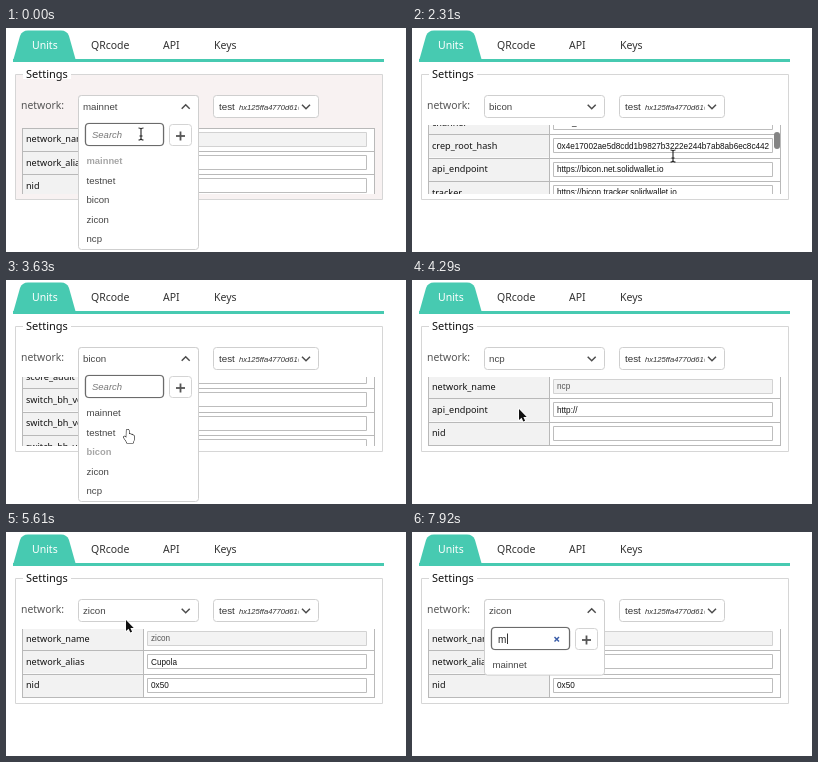
An HTML page with a canvas that plays this animation: 400 px wide and 224 px high, repeating every 8 s.

```html
<!DOCTYPE html>
<html lang="en">
<head>
<meta charset="utf-8">
<title>Network settings</title>
<style>
  html, body { margin: 0; width: 100%; height: 100%; overflow: hidden; background: #fff; }
  canvas { display: block; width: 400px; height: 224px; }
</style>
</head>
<body>
<canvas id="stage"></canvas>
<script>
const W = 400, H = 224, LOOP = 8000, STEP = 330;
const canvas = document.getElementById('stage');
const ctx = canvas.getContext('2d');
const dpr = window.devicePixelRatio || 1;
canvas.width = W * dpr;
canvas.height = H * dpr;

const SANS = '"Liberation Sans", Arial, sans-serif';
const NOTO = '"Noto Sans", "Open Sans", sans-serif';
const GREEN = '#47cab1';
const ROW = 23.4;
const VIEW = { x: 16, y: 97, w: 353, h: 69 };
const NETWORKS = ['mainnet', 'testnet', 'bicon', 'zicon', 'ncp'];

const basic = (name, alias, nid) => [
  ['network_name', name], ['network_alias', alias], ['nid', nid]
];
const ROWS = {
  mainnet: basic('mainnet', 'Mainnet', '0x1'),
  testnet: basic('testnet', 'Arcade', '0x2'),
  zicon: basic('zicon', 'Cupola', '0x50'),
  ncp: [['network_name', 'ncp'], ['api_endpoint', 'http://'], ['nid', '']],
  bicon: [
    ...basic('bicon', 'Orchard', '0x3'),
    ['channel', 'icon_dex'],
    ['crep_root_hash', '0x4e17002ae5d8cdd1b9827b3222e244b7ab8ab6ec8c442'],
    ['api_endpoint', 'https://bicon.net.solidwallet.io'],
    ['tracker', 'https://bicon.tracker.solidwallet.io'],
    ['score_fee', 'on'],
    ['score_audit', 'off'],
    ['switch_bh_versions.0.1a', '0'],
    ['switch_bh_versions.0.3', '1'],
    ['switch_bh_versions.0.4', '3100']
  ]
};

// One state per step; cursor is [shape, x, y].
const shut = (net, cursor, more) => ({ net, cursor, ...more });
const open = (net, cursor, more) => ({ net, cursor, open: true, query: '', ...more });
const low = { scroll: 4.5 };
const end = { scroll: 201.8 };
const STATES = [
  open('mainnet', ['beam', 135, 106]),
  open('mainnet', ['hand', 112, 150]),
  shut('testnet', ['arrow', 122, 124]),
  shut('testnet', ['hand', 160, 85]),
  open('testnet', ['deny', 122, 145], { caret: true }),
  open('testnet', ['hand', 112, 168], { caret: true }),
  shut('bicon', ['beam', 254, 130]),
  shut('bicon', ['beam', 261, 128], { scroll: 86.8, thumb: 1 }),
  shut('bicon', ['beam', 261, 128], { scroll: 172, thumb: 1 }),
  shut('bicon', ['hand', 160, 85], { ...end, thumb: 1 }),
  open('bicon', ['arrow', 150, 102], { ...end, thumb: 0.5, caret: true }),
  open('bicon', ['hand', 122, 150], end),
  open('bicon', ['hand', 112, 204], { ...end, caret: true }),
  shut('ncp', ['arrow', 107, 129], low),
  shut('ncp', ['hand', 172, 78], low),
  open('ncp', ['arrow', 140, 118], { ...low, caret: true }),
  open('ncp', ['hand', 112, 186], low),
  shut('zicon', ['arrow', 120, 88], low),
  shut('zicon', ['hand', 172, 78], low),
  open('zicon', ['beam', 152, 104], { ...low, caret: true }),
  open('zicon', null, low),
  open('zicon', null, { ...low, caret: true }),
  open('zicon', null, { ...low, query: 'b', caret: true }),
  open('zicon', null, { ...low, caret: true }),
  open('zicon', null, { ...low, query: 'm', caret: true })
];

function text(str, x, y, size, color = '#333', style = '', family = SANS) {
  ctx.font = `${style} ${size}px ${family}`;
  ctx.fillStyle = color;
  ctx.fillText(str, x, y);
}

function box(x, y, w, h, fill, stroke, r = 0, line = 1) {
  ctx.beginPath();
  ctx.roundRect(x + 0.5, y + 0.5, w, h, r);
  if (fill) { ctx.fillStyle = fill; ctx.fill(); }
  if (stroke) { ctx.strokeStyle = stroke; ctx.lineWidth = line; ctx.stroke(); }
}

function line(points, color, width = 1) {
  ctx.beginPath();
  points.forEach(([x, y]) => ctx.lineTo(x, y));
  ctx.strokeStyle = color;
  ctx.lineWidth = width;
  ctx.stroke();
}

function clipTo(x, y, w, h, draw) {
  ctx.save();
  ctx.beginPath();
  ctx.rect(x, y, w, h);
  ctx.clip();
  draw();
  ctx.restore();
}

function chevron(x, y, up) {
  const d = up ? -2 : 2;
  line([[x - 4, y - d], [x, y + d], [x + 4, y - d]], '#4c4c4c', 1.5);
}

function drawTabs() {
  ctx.fillStyle = GREEN;
  ctx.fillRect(7, 31, 371, 3);
  ctx.fill(new Path2D('M7 33 L14 8 Q16 2.5 22 2.5 H55 Q61 2.5 63 8 L70 33 Z'));
  text('Units', 26, 20.5, 10.5, '#fff', '', NOTO);
  [['QRcode', 85], ['API', 157], ['Keys', 208]].forEach(([name, x]) =>
    text(name, x, 20.5, 10.5, '#333', '500', NOTO));
}

function drawFieldset(net) {
  box(9, 46, 367, 125, net === 'mainnet' ? '#f8f2f2' : '#fff', '#d6d6d6');
  ctx.fillStyle = '#fff';
  ctx.fillRect(17, 40, 48, 11);
  text('Settings', 20, 50, 11, '#111', '', NOTO);
  text('network:', 15, 81, 10.4, '#555', '', NOTO);
}

function drawRow([label, value], y) {
  const top = Math.round(y);
  ctx.fillStyle = '#f2f2f2';
  ctx.fillRect(16, top, 121, ROW);
  ctx.fillStyle = '#fff';
  ctx.fillRect(137, top, 231, ROW);
  text(label, 20, y + 14.6, 9.1, '#111', '', NOTO);
  const locked = label === 'network_name';
  box(141, top + 4, 219, 14, locked ? '#f3f3f3' : '#fff', locked ? '#d2d2d2' : '#bdbdbd');
  clipTo(142, top, 217, ROW, () =>
    text(value, 145, y + 14.3, 8.2, locked ? '#555' : '#111'));
  line([[16, top + 0.5], [369, top + 0.5]], '#b9b9b9');
}

function drawTable({ net, scroll = 0, thumb }) {
  clipTo(VIEW.x, VIEW.y, VIEW.w, VIEW.h, () => {
    const rows = ROWS[net], top = 99.5 - scroll;
    rows.forEach((row, i) => drawRow(row, top + i * ROW));
    const bottom = Math.round(top + rows.length * ROW) + 0.5;
    line([[16, bottom], [369, bottom]], '#b9b9b9');
    [16.5, 137.5, 368.5].forEach(x => line([[x, Math.round(top)], [x, bottom]], '#b9b9b9'));
    if (thumb) {
      ctx.globalAlpha = thumb;
      box(361.5, 96.5 + scroll * 0.08, 6, 17, '#858585', null, 3);
    }
  });
}

function drawSelects(net, isOpen) {
  box(72, 67, 120, 22, '#fff', '#cfcfcf', 3);
  if (!isOpen) text(net, 77, 81.5, 9.7, '#444');
  chevron(179.7, 78.7, isOpen);
  box(207, 67, 105, 22, '#fff', '#cfcfcf', 3);
  text('test', 213, 81.5, 9.8, '#333');
  clipTo(232, 70, 60.5, 18, () =>
    text('hx125ffa4770d61e', 233, 81.5, 7.6, '#333', 'italic'));
  chevron(300, 78.7, false);
}

function drawPanel({ net, query, caret }) {
  const items = NETWORKS.filter(name => name.includes(query));
  box(72, 67, 120, 56 + items.length * 19.6, '#fff', '#cfcfcf', 3);
  text(net, 77, 81.5, 9.7, '#444');
  chevron(179.7, 78.7, true);

  box(78, 94, 80, 24, '#e4e4e4', null, 5);
  box(79, 95, 78, 22, '#fff', '#6b6b6b', 3.5, 1.2);
  if (query) {
    text(query, 86, 110.5, 10, '#222');
    line([[142.5, 105], [147, 109.5]], '#3a5da8', 1.5);
    line([[147, 105], [142.5, 109.5]], '#3a5da8', 1.5);
  } else {
    text('Search', 86, 110, 9.5, '#777', 'italic');
  }
  if (caret) {
    const x = 86 + (query ? ctx.measureText(query).width + 0.5 : 0);
    const left = query ? 86 + Math.round(x - 86) + 0.5 : 86.5;
    line([[left, 101.5], [left, 112]], '#333');
  }

  box(163, 96, 22, 21, '#fff', '#d4d4d4', 3);
  line([[170, 108], [179, 108]], '#555', 1.8);
  line([[174.5, 103.5], [174.5, 112.5]], '#555', 1.8);

  items.forEach((name, i) => {
    const current = name === net, y = 136 + i * 19.6;
    text(name, 80.5, y, current ? 9.4 : 9.6, current ? '#a6a6a6' : '#444', current ? 'bold' : '');
  });
}

const SHAPES = {
  arrow: new Path2D('M0 0 V11 L2.6 8.7 L4.3 12.6 L6.1 11.8 L4.4 8 H7.7 Z'),
  hand: new Path2D('M-1.5 0 Q0 -1 1 .5 V4 Q2.2 3.4 3 4.6 Q4.2 4 4.8 5.2 Q6 5 6.2 6.3 V9 Q6 10.5 5 13 H-1 Q-2 10.5 -4 8 Q-4.8 6.5 -3.2 6.3 L-1.7 7.7 Z'),
  beam: new Path2D('M-2.5 -6 Q0 -6 0 -4.5 V4.5 Q0 6 -2.5 6 M2.5 -6 Q0 -6 0 -4.5 M0 4.5 Q0 6 2.5 6 M-1.5 2 H1.5')
};

function drawCursor([shape, x, y]) {
  ctx.save();
  ctx.translate(x, y);
  ctx.lineJoin = 'round';
  if (shape === 'beam') {
    ctx.strokeStyle = '#222';
    ctx.lineWidth = 1.1;
    ctx.stroke(SHAPES.beam);
  } else {
    const hand = shape === 'hand';
    const path = hand ? SHAPES.hand : SHAPES.arrow;
    ctx.strokeStyle = hand ? '#111' : '#fff';
    ctx.fillStyle = hand ? '#fff' : '#111';
    ctx.lineWidth = hand ? 1.1 : 1.6;
    ctx.stroke(path);
    ctx.fill(path);
  }
  if (shape === 'deny') {
    ctx.beginPath();
    ctx.arc(6, 17, 4.7, 0, Math.PI * 2);
    ctx.fillStyle = '#fff';
    ctx.fill();
    ctx.strokeStyle = '#8c8c8c';
    ctx.lineWidth = 1.6;
    ctx.stroke();
    line([[2.7, 13.7], [9.3, 20.3]], '#8c8c8c', 1.6);
  }
  ctx.restore();
}

function draw(now) {
  const state = STATES[Math.floor((now % LOOP) / STEP)];
  ctx.setTransform(dpr, 0, 0, dpr, 0, 0);
  ctx.fillStyle = '#fff';
  ctx.fillRect(0, 0, W, H);
  drawTabs();
  drawFieldset(state.net);
  drawTable(state);
  drawSelects(state.net, state.open);
  if (state.open) drawPanel(state);
  if (state.cursor) drawCursor(state.cursor);
}

const start = performance.now();
function tick() {
  draw(performance.now() - start);
  requestAnimationFrame(tick);
}
tick();
</script>
</body>
</html>
```
